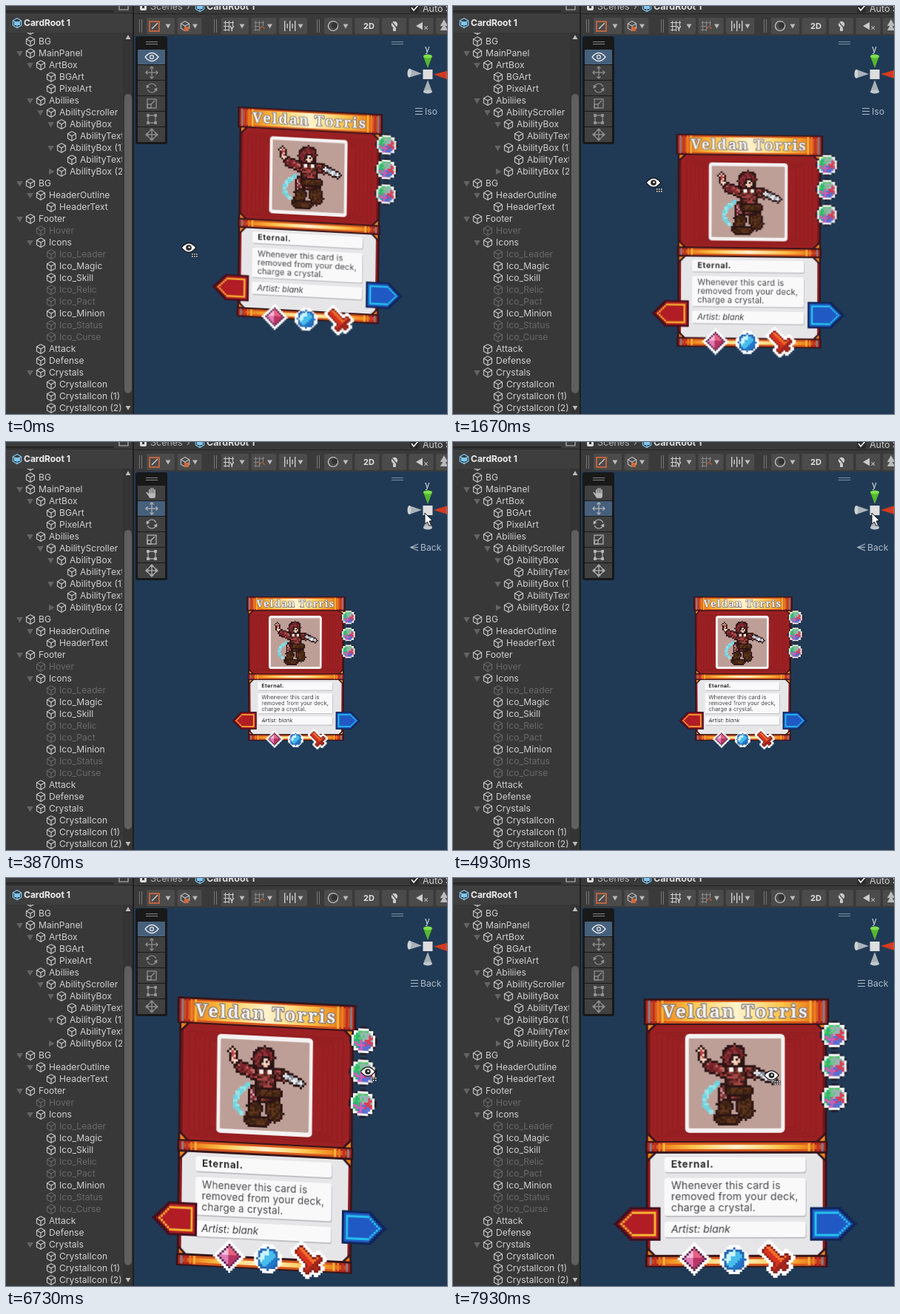
These frames come from a looping animation (596x552 px, 8000 ms). An HTML page with a canvas:

```html
<!DOCTYPE html>
<html lang="en">
<head>
<meta charset="utf-8">
<title>Card prefab in the scene view</title>
<style>
html, body { margin: 0; width: 100%; height: 100%; overflow: hidden; background: #203a56; }
#stage { position: relative; width: 596px; height: 552px; overflow: hidden; }
canvas { position: absolute; left: 0; top: 0; transform-origin: 0 0; }
</style>
</head>
<body>
<div id="stage"></div>
<script>
const W = 596, H = 552, LOOP = 8000, STEP = 200 / 3;
const CARD_W = 250, CARD_H = 362, PAD = 50;
const UI = 'Inter, sans-serif';
const stage = document.getElementById('stage');

function makeCanvas(w, h, res) {
  const cv = document.createElement('canvas');
  cv.width = w * res;
  cv.height = h * res;
  cv.style.width = w + 'px';
  cv.style.height = h + 'px';
  stage.append(cv);
  const c = cv.getContext('2d');
  c.scale(res, res);
  return c;
}

// ---------- drawing helpers ----------
function box(c, x, y, w, h, fill, r = 0) {
  c.fillStyle = fill;
  c.beginPath();
  c.roundRect(x, y, w, h, r);
  c.fill();
}
function poly(c, pts, fill, stroke, width = 1.2) {
  c.beginPath();
  for (let i = 0; i < pts.length; i += 2) c.lineTo(pts[i], pts[i + 1]);
  if (fill) { c.closePath(); c.fillStyle = fill; c.fill(); }
  if (stroke) { c.strokeStyle = stroke; c.lineWidth = width; c.stroke(); }
}
function triangle(c, x, y, r, angle, fill) {
  const pts = [0, 1, 2].flatMap(i => {
    const a = angle + i * Math.PI * 2 / 3;
    return [x + r * Math.cos(a), y + r * Math.sin(a)];
  });
  poly(c, pts, fill);
}
function label(c, s, x, y, font, fill, spacing = 0) {
  c.font = font;
  c.fillStyle = fill;
  c.letterSpacing = spacing + 'px';
  c.fillText(s, x, y);
}
function ring(c, x, y, r, stroke, from = 0, to = 7) {
  c.beginPath();
  c.arc(x, y, r, from, to);
  c.strokeStyle = stroke;
  c.lineWidth = 1.2;
  c.stroke();
}
function disc(c, x, y, r, fill) {
  c.beginPath();
  c.arc(x, y, r, 0, 7);
  c.fillStyle = fill;
  c.fill();
}
function cube(c, x, y, r, color) {
  const a = r * .87, b = r * .5;
  poly(c, [x, y - r, x + a, y - b, x + a, y + b, x, y + r, x - a, y + b, x - a, y - b, x, y - r], null, color);
  poly(c, [x - a, y - b, x, y, x + a, y - b], null, color);
  poly(c, [x, y, x, y + r], null, color);
}
function prefab(c, x, y) {
  cube(c, x, y, 6.5, '#7cc8f2');
  box(c, x - 4, y - 2, 8, 5, '#7cc8f2');
}
const noise = (x, y) => {
  const v = Math.sin(x * 12.99 + y * 78.23) * 43758.5;
  return v - Math.floor(v);
};
const pick = (list, x, y) => list[Math.floor(noise(x, y) * list.length)];

// Blocky shape: colour(x, y) decides each cell
function cells(c, cx, cy, n, colour, size = 3) {
  for (let y = -n; y <= n; y++) for (let x = -n; x <= n; x++) {
    const col = colour(x, y);
    if (col) box(c, cx + (x - .5) * size, cy + (y - .5) * size, size + .1, size + .1, col);
  }
}

// ---------- editor frame ----------
const TREE = `0 CardBack
0 BG
0 v MainPanel
1 v ArtBox
2 BGArt
2 PixelArt
1 v Abiliies
2 v AbilityScroller
3 v AbilityBox
4 AbilityText
3 v AbilityBox (1)
4 AbilityText
3 > AbilityBox (2)
0 v BG
1 v HeaderOutline
2 HeaderText
0 v Footer
1 - Hover
1 v Icons
2 - Ico_Leader
2 Ico_Magic
2 Ico_Skill
2 - Ico_Relic
2 - Ico_Pact
2 Ico_Minion
2 - Ico_Status
2 - Ico_Curse
1 Attack
1 Defense
1 v Crystals
2 CrystalIcon
2 CrystalIcon (1)
2 CrystalIcon (2)`.split('\n');

function drawTree(c) {
  box(c, 0, 0, 173, H, '#383838');
  c.save();
  c.beginPath();
  c.rect(0, 36, 157, H);
  c.clip();
  TREE.forEach((row, i) => {
    const [, depth, mark, name] = row.match(/^(\d) (?:([v>-]) )?(.*)$/);
    const x = 33 + depth * 14, y = 32 + i * 16, dim = mark === '-';
    cube(c, x, y, 6.3, dim ? '#666' : '#c4c4c4');
    if (mark === 'v') triangle(c, x - 14.5, y - .5, 5, Math.PI / 2, '#646464');
    if (mark === '>') triangle(c, x - 14.5, y, 5, 0, '#646464');
    label(c, name, x + 11, y + .5, '12.1px ' + UI, dim ? '#696969' : '#d0d0d0');
  });
  c.restore();
  box(c, 158, 36, 14, H - 36, '#343434');
  box(c, 160, 119, 10, 405, '#5f5f5f', 5);
  triangle(c, 165, 43, 4, -Math.PI / 2, '#bbb');
  triangle(c, 165, 543, 4, Math.PI / 2, '#bbb');
  box(c, 0, 0, 172, 9, '#3b3b3b');
  box(c, 0, 6, 146, 2, '#242424');
  poly(c, [153, -2, 153, 5, 165, 5, 165, -2], null, '#bbb');
  box(c, 0, 9, 172, 27, '#3e3e3e');
  box(c, 0, 9, 172, 1, '#262626');
  prefab(c, 15, 23);
  label(c, 'CardRoot 1', 24, 23, 'bold 12px ' + UI, '#eee');
  box(c, 171, 0, 2, H, '#202020');
}

function grid(c, x, col) {
  for (const d of [2, 7, 12]) {
    box(c, x + d - 1, 20, 1, 14, col);
    box(c, x - 1, 20 + d, 14, 1, col);
  }
  box(c, x + 7, 27, 8, 8, '#4b4b4b');
}

function drawToolbar(c) {
  box(c, 173, 0, W, 40, '#3a3a3a');
  box(c, 173, 10, W, 1, '#232323');
  box(c, 181, -4, 9, 10, '#ddd', 2);
  box(c, 184, 0, 3, 3, '#383838');
  label(c, 'Scenes', 195, 1, '12.5px ' + UI, '#b0b0b0');
  label(c, '›', 244, 1, '12.5px ' + UI, '#aaa');
  prefab(c, 262, 1);
  label(c, 'CardRoot 1', 271, 1, 'bold 12.5px ' + UI, '#ddd');
  box(c, 546, -3, 12, 12, '#2a2a2a', 2);
  poly(c, [548, 2, 551, 6, 557, -1], null, '#eee', 1.7);
  label(c, 'Auto S', 563, 4, '12.5px ' + UI, '#ccc');

  // Button groups: start, widths, and how many open a menu
  for (const [start, widths, menus] of [[190, [38, 33], 2], [291, [37, 34, 38], 3], [430, [38, 33, 33, 33, 20], 1]]) {
    for (const d of [0, 3]) box(c, start - 10 + d, 18, 1, 18, '#777');
    let x = start;
    widths.forEach((w, i) => {
      box(c, x, 16, w, 22, '#4b4b4b', 2);
      if (i < menus) triangle(c, x + w - 9, 26.5, 4, Math.PI / 2, '#bbb');
      x += w + 3.5;
    });
  }
  c.strokeStyle = '#d0683c';
  c.strokeRect(194, 21, 13, 13);
  poly(c, [197, 31, 205, 23], null, '#ccc', 1.5);
  cube(c, 242, 27, 6.5, '#bbb');
  box(c, 241, 28, 6, 6, '#d0683c');
  grid(c, 295, '#ccc');
  grid(c, 336, '#888');
  label(c, 'Y', 302, 31, 'bold 9px ' + UI, '#ddd');
  ring(c, 346, 31, 3, '#c0603c', Math.PI, 0);
  for (let i = 0; i < 5; i++) box(c, 376 + i * 3.5, i % 2 ? 24 : 20, 1.4, i % 2 ? 6 : 14, '#ccc');
  ring(c, 442, 27, 6.5, '#d0d0d0');
  disc(c, 444, 26, 4, '#333');
  label(c, '2D', 483, 27.5, 'bold 11px ' + UI, '#e0e0e0');
  disc(c, 525, 25, 4.2, '#ccc');
  box(c, 523, 29, 4, 5, '#ccc', 1);
  poly(c, [520, 20, 531, 33], null, '#4b4b4b');
  triangle(c, 560, 27, 6, Math.PI, '#ccc');
  label(c, '×', 564, 30, '11px ' + UI, '#ccc');
  for (const y of [24, 30]) triangle(c, 592, y, 6, -Math.PI / 2, '#bbb');
}

// ---------- card ----------
const INK = '#35151a', RED = '#9b2023', ORANGE = '#ee8420';

function goldBar(c, x, y, w, h) {
  box(c, x, y, w, h, INK);
  box(c, x + 3, y + 2.5, w - 6, h - 5, '#a8231f');
  const inset = h > 20 ? 5 : 5.5;
  const shine = c.createLinearGradient(x, 0, x + w, 0);
  ['#b4281f', '#f08c22', '#fcc247', '#fde08c', '#fff3cf', '#fde08c', '#fcc247', '#f08c22', '#b4281f']
    .forEach((col, i) => shine.addColorStop(i / 8, col));
  box(c, x + 22, y + 2.5, w - 44, h - 5, '#d8581e');
  box(c, x + 5, y + inset, w - 10, h - 2 * inset, shine);
  for (let i = 0; i < 4; i++) for (const e of [6 + i * 6, w - 9 - i * 6])
    box(c, x + e, y + 3, 3, h - 6, ['#8a7a86', '#c23020', '#ee7c20', '#fbb638'][i]);
}

// Capsule of mottled cells with a dark rim
function limb(c, x1, y1, x2, y2, r, palette) {
  const dx = x2 - x1, dy = y2 - y1, len = dx * dx + dy * dy || 1;
  for (let y = 0; y < 40; y++) for (let x = 0; x < 41; x++) {
    const k = Math.max(0, Math.min(1, ((x - x1) * dx + (y - y1) * dy) / len));
    const d = Math.hypot(x - x1 - k * dx, y - y1 - k * dy);
    if (d <= r) box(c, x, y, 1.05, 1.05, d > r - .9 ? '#2b1414' : pick(palette, x, y));
  }
}

function drawHero(c) {
  const hair = ['#7c262b', '#92343a', '#682024'], skin = ['#efc4b0', '#f7dccc'];
  const cloth = ['#3a1c18', '#52281c', '#7c3030', '#a84444'], leather = ['#4a2818', '#5e341c', '#38200f'];
  const pink = ['#d99ca4', '#b87880', '#7c3030'], steel = ['#f4f2f4', '#d4d8e0', '#868c98'];
  c.save();
  c.translate(61, 54);
  c.scale(3, 3);
  for (let a = 0; a <= 1; a += .04)
    box(c, Math.round(12 - 6 * Math.sin(a * 2.8)), Math.round(19 + 14 * a), 2, 2, a % .2 < .12 ? '#72d4de' : '#94e4ea');
  limb(c, 16, 22, 15, 29, 3, pink);
  limb(c, 23, 23, 25, 32, 4, leather);
  limb(c, 16, 30, 14, 35, 3.3, leather);
  limb(c, 13, 36, 21, 36, 2, leather);
  limb(c, 17, 15, 9, 12, 3, [...hair, '#c06a60']);
  limb(c, 6, 9, 5, 5, 2, [...skin, '#b64545']);
  limb(c, 24, 14, 29, 15, 3, cloth);
  limb(c, 30, 15, 37, 18, 2.2, steel);
  limb(c, 20, 15, 21, 23, 5, cloth);
  limb(c, 18, 23, 26, 23, 2.5, leather);
  limb(c, 20, 7, 19, 8, 5, hair);
  limb(c, 20.5, 9, 20.5, 10, 2.6, skin);
  for (const x of [19, 21]) box(c, x, 9, 1, 1, '#2b1414');
  for (const x of [18, 22]) box(c, x, 13, 2, 2, '#f7ede8');
  c.restore();
}

function drawBody(c) {
  c.textBaseline = 'alphabetic';
  box(c, 3, 30, 244, 325, INK);
  box(c, 6, 35, 238, 160, '#6e171c');
  box(c, 9, 36, 232, 157, RED);
  c.strokeStyle = 'rgba(110,20,26,.22)';
  c.lineWidth = 1.5;
  for (let i = 0; i < 5; i++) c.strokeRect(18 + i * 7, 46 + i * 3, 214 - i * 14, 140 - i * 6);
  box(c, 6, 208, 238, 141, '#8e1b20');
  box(c, 9, 208, 232, 141, '#e6e6e8');
  for (const [top, bottom] of [[35, 193], [208, 348]])
    for (const sx of [1, -1]) for (const sy of [1, -1]) {
      const x = sx > 0 ? 6 : 244, y = sy > 0 ? top : bottom;
      poly(c, [x, y, x + 12 * sx, y, x, y + 12 * sy], INK);
      poly(c, [x, y, x + 8 * sx, y, x, y + 8 * sy], ORANGE);
    }
  goldBar(c, 0, 0, 250, 36);
  goldBar(c, 2, 192, 246, 17);
  goldBar(c, 2, 346, 246, 17);

  c.font = 'bold 24.5px "Noto Serif", serif';
  c.textAlign = 'center';
  c.letterSpacing = '2.3px';
  c.lineJoin = 'round';
  c.strokeStyle = '#857a74';
  c.lineWidth = 2.6;
  c.strokeText('Veldan Torris', 124, 26);
  c.fillStyle = '#f4f2f0';
  c.fillText('Veldan Torris', 124, 26);
  c.textAlign = 'left';

  box(c, 56, 48, 134, 133, '#f4f2f2', 5);
  box(c, 61, 54, 124, 121, '#be9f98', 1);
  drawHero(c);

  for (const [y, h] of [[214, 20], [242, 51], [301, 21]]) {
    box(c, 29, y + 2, 190, h, '#c2c2c6', 3);
    box(c, 28, y, 190, h, '#f9f9fa', 3);
  }
  label(c, 'Eternal.', 37, 228, 'bold 13.5px ' + UI, '#2c2c2e', .8);
  ['Whenever this card is', 'removed from your deck,', 'charge a crystal.'].forEach((s, i) =>
    label(c, s, 37, 257 + i * 15, '14px ' + UI, '#48484c', .2));
  label(c, 'Artist: blank', 37, 316, 'italic 14px ' + UI, '#404044');
}

function drawGems(c) {
  const hues = ['#dc3c54', '#5a6fd0', '#cf5fb4', '#2fb574', '#56cc6a', '#98b4b4'];
  for (let i = 0; i < 3; i++) cells(c, 257, 49 + i * 42.5, 6, (x, y) => {
    const r = Math.hypot(x, y);
    if (r > 6.3) return null;
    if (r > 5.7) return '#23202c';
    if (r > 4.6) return '#f8f8f8';
    const turn = Math.atan2(y, x) / (2 * Math.PI) + 1 + (noise(x, y) - .5) * .2;
    return hues[Math.floor(turn * 6 + .4) % 6];
  });
}

function arrow(c, cx, cy, dir, [edge, fill, line]) {
  cells(c, cx, cy, 10, (x, y) => {
    const u = x * dir, v = Math.abs(y);
    const inside = m => v <= 7 - m && u >= m - 10 && u <= 10 - v - m * 1.2;
    if (!inside(0)) return null;
    if (!inside(1)) return edge;
    return inside(2) && !inside(3) ? line : fill;
  });
}

function drawIcons(c) {
  arrow(c, -9, 304, -1, ['#420f1c', '#b21d25', '#f8b530']);
  arrow(c, 256, 304, 1, ['#0f2558', '#2059c4', '#24c4ee']);
  cells(c, 68, 351, 7, (x, y) => {
    const d = Math.abs(x) + Math.abs(y);
    if (d > 7) return null;
    if (d > 5) return '#fff';
    if (d > 4) return '#5c2450';
    const shade = x < 0 ? ['#f6bcdc', '#e07cb4'] : ['#e86080', '#b83464'];
    return shade[y < 0 ? 0 : 1];
  });
  cells(c, 122, 352, 6, (x, y) => {
    const r = Math.hypot(x, y);
    if (r > 6.4) return null;
    if (r > 5) return '#fff';
    if (r > 4) return '#2566b4';
    return x + y + noise(x, y) * 2 < -1 ? '#c8f4ff' : x + y < 3 ? '#48bdec' : '#2078ca';
  });
  cells(c, 179, 351, 8, (x, y) => {
    const u = x + y, v = Math.abs(x - y);
    const inside = m => (u >= -9 - m && u <= 4 + m && v <= 2 + m) ||
      (Math.abs(u - 4) <= 1 + m && v <= 6 + m) || (u >= 4 && u <= 8 + m && v <= 1 + m);
    if (inside(0)) return u > 3 ? '#a5261e' : x > y ? '#f4702c' : '#d8321e';
    return inside(1) ? '#8c2018' : inside(3) ? '#fff' : null;
  });
}

// ---------- overlay ----------
function drawTools(c, viewing) {
  const col = viewing ? '#949494' : '#b8b8b8', x = 197;
  box(c, 175, 41, 43, 146, '#191919', 3);
  for (let i = 0; i < 6; i++)
    box(c, 178, 59 + i * 21, 37, 20, i === (viewing ? 0 : 1) ? '#46607c' : '#404040', 1);
  for (const y of [48, 51]) box(c, 189, y, 16, 1, '#888');
  if (viewing) drawEye(c, x, 69, false);
  else {
    box(c, x - 4, 69, 9, 7, col, 3);
    for (let i = 0; i < 4; i++) box(c, x - 4 + i * 2.4, i % 3 ? 62 : 64, 1.7, 9, col, 1);
    poly(c, [x - 7, 68, x - 2, 75], null, col, 2);
  }
  for (let a = 0; a < 4; a++) {
    for (const [y, r] of [[90, 8], [174, 8]]) {
      c.save();
      c.translate(x, y);
      c.rotate(a * Math.PI / 2);
      poly(c, [0, 0, 0, -r], null, col);
      poly(c, [-2.5, 2.5 - r, 0, -r, 2.5, 2.5 - r], null, col);
      c.restore();
    }
  }
  for (const side of [0, Math.PI]) {
    ring(c, x, 111, 6, col, side + .5, side + 2.8);
    triangle(c, x + 6 * Math.cos(side + .3), 111 + 6 * Math.sin(side + .3), 3, side - 1, col);
  }
  c.strokeRect(x - 6, 126, 12, 12);
  c.strokeRect(x - 6, 133, 5, 5);
  poly(c, [x - 1, 133, x + 4, 128], null, col);
  c.strokeRect(x - 5, 148, 10, 10);
  for (const dx of [-5, 5]) for (const dy of [-5, 5]) box(c, x + dx - 2, 151 + dy, 4, 4, col, 1);
  ring(c, x, 174, 5.5, col);
}

function cone(c, angle, len, fill, shade) {
  c.save();
  c.translate(570, 92);
  c.rotate(angle);
  poly(c, [8, 0, len, -6, len, 6], fill);
  c.beginPath();
  c.ellipse(len, 0, 2.5, 6, 0, 0, 7);
  c.fillStyle = shade;
  c.fill();
  c.restore();
}

function drawGizmo(c, tilt, t) {
  const q = Math.PI / 2;
  cone(c, q, 24, '#a8b0b4', '#c2c8ca');
  cone(c, 2 * q + tilt, 25, '#a9b2b8', '#cdd2d4');
  cone(c, tilt, 27, '#d23a20', '#e2492c');
  cone(c, -q, 24, '#55b82e', '#7fe04c');
  box(c, 563.5, 86, 13, 13, '#dedede');
  label(c, 'y', 566, 58, '12px ' + UI, '#e4e4e4');
  for (const y of [48, 51]) box(c, 521, y, 16, 1, '#8391a0');
  const iso = t < 2530 || t >= 5130, col = '#b0bac5';
  const name = t < 2530 ? 'Iso' : t < 3270 ? 'Persp' : 'Back';
  const x = name === 'Iso' ? 553 : 547;
  if (iso) for (const dy of [-4, 0, 4]) box(c, x, 142 + dy, 10, 1, col);
  else {
    poly(c, [x + 10, 138, x, 142.5, x + 10, 147], null, col);
    poly(c, [x, 142.5, x + 10, 142.5], null, col);
  }
  label(c, name, x + 13, 143, '12.2px ' + UI, col);
}

function drawEye(c, x, y, solid = true) {
  c.beginPath();
  c.moveTo(x - 9, y);
  c.quadraticCurveTo(x, y - 11, x + 9, y);
  c.quadraticCurveTo(x, y + 11, x - 9, y);
  c.strokeStyle = solid ? '#111' : '#e8e8e8';
  c.lineWidth = solid ? 2.5 : 1.4;
  c.stroke();
  if (!solid) return ring(c, x, y, 2.4, '#e8e8e8');
  c.fillStyle = '#fff';
  c.fill();
  disc(c, x, y, 3.8, '#222');
  disc(c, x + .5, y - .5, 1.3, '#fff');
  for (let i = 0; i < 6; i++) {
    const dx = x + 4 + (i % 3) * 3, dy = y + 8 + Math.floor(i / 3) * 3;
    box(c, dx - .5, dy - .5, 2.6, 2.6, '#111');
    box(c, dx, dy, 1.6, 1.6, '#fff');
  }
}

function drawPointer(c, x, y) {
  poly(c, [x, y, x, y + 15, x + 3.5, y + 12, x + 6, y + 17.5, x + 8.5, y + 16.5, x + 6, y + 11, x + 10.5, y + 10.5, x, y], '#fff', '#111', 1);
}

// ---------- motion ----------
const GRAB = 1930, REGRAB = 5670;
const pointerKeys = [
  [0, 247, 327], [670, 284, 212], [930, 280, 215], [1330, 243, 305], [1670, 271, 239], [GRAB, 271, 239],
  [2870, 579, 94], [3130, 579, 94], [3470, 566, 96], [5130, 566, 96],
  [REGRAB, 470, 300], [6730, 489, 262], [LOOP, 430, 267]
];
const lerp = (a, b, k) => a.map((v, i) => v + (b[i] - v) * k);
const ease = (t, from, to) => {
  const k = Math.max(0, Math.min(1, (t - from) / (to - from)));
  return k * k * (3 - 2 * k);
};

function pointerAt(t) {
  const i = pointerKeys.findIndex(([end], n) => n && t <= end);
  const [from, ...a] = pointerKeys[i - 1], [to, ...b] = pointerKeys[i];
  return lerp(a, b, ease(t, from, to));
}

// A view is [x, y, scale, slope, liftX, liftY, pinch]; dragging the pointer orbits it
function firstOrbit(t) {
  const [px, py] = pointerAt(Math.min(t, GRAB));
  const k = (py - 212) / 115;
  return [295 + (284 - px) * .5, 184 - 48 * k, .798 - .015 * k, .053 * k, 0, 7 * k, 0];
}
function lastOrbit(t) {
  const k = (pointerAt(Math.max(t, REGRAB))[0] - 431) / 58;
  return [257.5 - 25.5 * k, 163 - 3 * k, 1.003, .05 * k, 8 * k, -4 * k, 0];
}
function viewAt(t) {
  const persp = [309, 181, .605, .01, 0, 5, 4], back = [325, 209, .538, 0, 1, 4, 1];
  let view = lerp(firstOrbit(t), persp, ease(t, 2500, 2860));
  view = lerp(view, back, ease(t, 3100, 3500));
  return lerp(view, lastOrbit(t), ease(t, 5130, 6200));
}

function corners([x, y, scale, slope, liftX, , pinch]) {
  const w = CARD_W * scale * (1 - Math.abs(liftX) * .0045), h = CARD_H * scale;
  const rise = w * slope, lean = -.35 * rise;
  return [x, y, x + w, y + rise, x + w + lean - pinch, y + rise + h, x + lean + pinch, y + h];
}

// Projective map of the flat card onto four corners
function project([x0, y0, x1, y1, x2, y2, x3, y3], dx, dy) {
  const ax = x1 - x2, ay = y1 - y2, bx = x3 - x2, by = y3 - y2;
  const sx = x0 - x1 + x2 - x3, sy = y0 - y1 + y2 - y3;
  const det = ax * by - bx * ay;
  const g = (sx * by - bx * sy) / det, h = (ax * sy - sx * ay) / det;
  const m = [
    (x1 - x0 + g * x1) / CARD_W, (y1 - y0 + g * y1) / CARD_W, 0, g / CARD_W,
    (x3 - x0 + h * x3) / CARD_H, (y3 - y0 + h * y3) / CARD_H, 0, h / CARD_H,
    0, 0, 1, 0, x0, y0, 0, 1
  ].map(v => v.toFixed(9));
  return `translate(${dx}px,${dy}px) matrix3d(${m}) translate(${-PAD}px,${-PAD}px)`;
}

const base = makeCanvas(W, H, 1);
base.textBaseline = 'middle';
box(base, 0, 0, W, H, '#203a56');
drawTree(base);
drawToolbar(base);

// Each layer follows the lift by its own share
const layers = [[drawBody, 0], [drawGems, .4], [drawIcons, 1]].map(([draw, share]) => {
  const c = makeCanvas(CARD_W + 2 * PAD, CARD_H + 2 * PAD, 2);
  c.translate(PAD, PAD);
  draw(c);
  return { style: c.canvas.style, share };
});

const over = makeCanvas(W, H, 1);
over.textBaseline = 'middle';

function render(t) {
  const view = viewAt(t), quad = corners(view);
  const [, , , slope, liftX, liftY] = view;
  for (const { style, share } of layers) style.transform = project(quad, liftX * share, liftY * share);
  const viewing = t < GRAB || t >= REGRAB;
  over.clearRect(0, 0, W, H);
  drawTools(over, viewing);
  drawGizmo(over, slope, t);
  (viewing ? drawEye : drawPointer)(over, ...pointerAt(t));
}

const begin = performance.now();
let shown = -1;
function tick() {
  const t = (performance.now() - begin) % LOOP;
  const n = Math.floor((t + 4) / STEP) % 120;
  if (n !== shown) render((shown = n) * STEP);
  requestAnimationFrame(tick);
}
tick();
</script>
</body>
</html>
```
